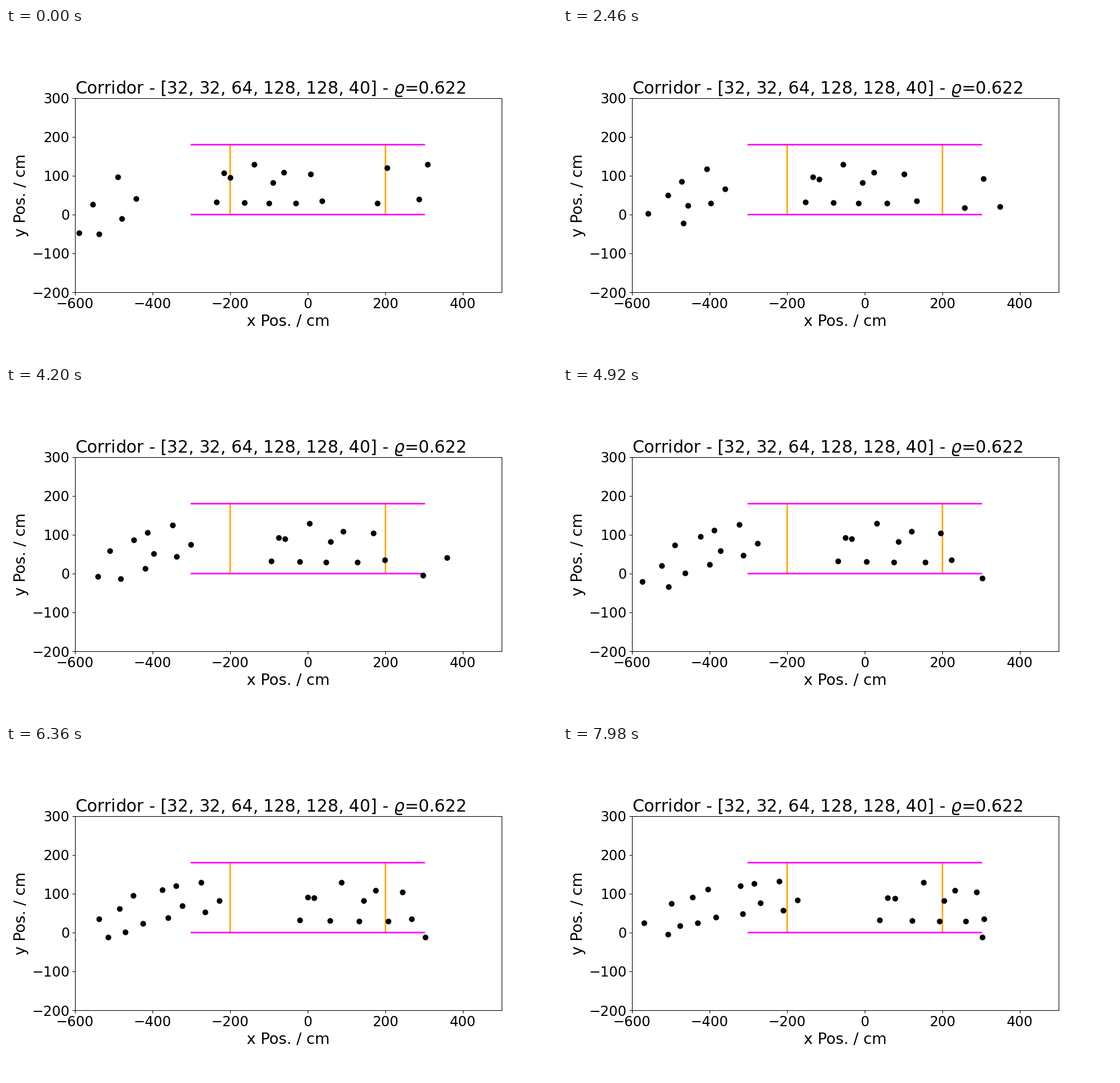
A matplotlib script that plays this animation: 966x580 px, repeating every 8000 ms.

```python
import numpy as np
import matplotlib.pyplot as plt
from matplotlib.animation import FuncAnimation

W, H, DPI = 966, 580, 100
K = 0.966                # scale of a 10 inch wide layout
times = np.arange(134) * 0.06

UPPER, MIDDLE, LOWER = 235, 267, 284   # heights the queue settles at
SETTLE = 3.2                           # seconds

# Where people start, in stage pixels; the third value is a later entry time
IN_CORRIDOR = [(369, 305), (418, 306), (435, 239), (461, 307), (468, 271),
               (487, 253), (508, 307), (534, 256), (554, 303)]
QUEUE = {
    UPPER: [(128, 359), (152, 309), (196, 261), (129, 360, 1.4),
            (145, 364, 3.3), (131, 358, 4.45)],
    MIDDLE: [(382, 254), (393, 262), (163, 361), (228, 299),
             (113, 345, 6.1), (167, 358, 6.8)],
    LOWER: [(203, 334), (195, 360, 1.62), (180, 360, 3.0),
            (176, 362, 4.4), (159, 360, 5.1)],
}
# Start, end, arrival time, time of leaving the scene
EXITS = [
    ((739, 239), (778, 257), 1.4, 1.4),
    ((724, 300), (771, 319), 3.0, 3.0),
    ((668, 245), (776, 307), 4.5, 4.5),
    ((651, 307), (735, 335), 4.6, 8.0),
]


def speed(x):
    """Pixels per second: faster inside the corridor, slower past its end."""
    rush = 4.5 * np.exp(-((x - 600) / 60) ** 2)
    jam = 9 / (1 + np.exp((712 - x) / 15))
    return 22.9 + rush - jam


# Travel time along the stage, shared by everyone
road = np.arange(100.0, 800.0)
clock = np.cumsum(1 / speed(road))


def walk(x, y, start=0, lane=None):
    """Follow the flow in x while the height settles into the lane."""
    t = times - start
    pace = 0.88 - 0.035 * start if start else 1
    phase = np.interp(x, road, clock) + pace * t
    px = np.interp(phase, clock, road)
    goal = y if lane is None else lane
    py = goal + (y - goal) * np.exp(-t / SETTLE)
    return np.where(t >= 0, [px, py], np.nan)


def leave(begin, end, arrive, gone):
    """Slow down in x while drifting downwards ever faster."""
    u = np.clip(times / arrive, 0, 1)
    px = begin[0] + (end[0] - begin[0]) * (1 - (1 - u) ** 1.3)
    py = begin[1] + (end[1] - begin[1]) * u ** 2
    return np.where(times < gone, [px, py], np.nan)


people = [walk(*p) for p in IN_CORRIDOR]
people += [walk(*p, lane=lane) for lane, group in QUEUE.items() for p in group]
people += [leave(*e) for e in EXITS]
px, py = np.array(people).transpose(1, 2, 0)
x_cm = (px - 120.75) / 0.6806 - 600
y_cm = (326.9 - py) / 0.6806

plt.rcParams["font.family"] = "DejaVu Sans"
fig, ax = plt.subplots(figsize=(W / DPI, H / DPI), dpi=DPI, facecolor="white")
fig.subplots_adjust(left=0.125, right=0.9, bottom=0.11, top=0.88)

ax.set_aspect("equal")
ax.set_xlim(-600, 500)
ax.set_ylim(-200, 300)
ax.set_xticks(range(-600, 500, 200))
ax.set_yticks(range(-200, 301, 100))
ax.tick_params(labelsize=18 * K, length=3.5 * K, width=0.8 * K, pad=3.5 * K)
for spine in ax.spines.values():
    spine.set_linewidth(0.8 * K)
ax.set_xlabel("x Pos. / cm", fontsize=20 * K, labelpad=4 * K)
ax.set_ylabel("y Pos. / cm", fontsize=20 * K, labelpad=4 * K)
ax.set_title(r"Corridor - [32, 32, 64, 128, 128, 40] - $\varrho$=0.622",
             loc="left", fontsize=22 * K, pad=6 * K)

for x in (-200, 200):
    ax.plot([x, x], [0, 180], color="orange", lw=2 * K, snap=False)
for y in (0, 180):
    ax.plot([-300, 300], [y, y], color="magenta", lw=2 * K, snap=False)
dots, = ax.plot([], [], "o", color="black", ms=6 * K, mew=1.5 * K, snap=False)


def update(i):
    step = (2 * i + 1) // 3   # 40 ms ticks, 60 ms steps
    dots.set_data(x_cm[step], y_cm[step])
    return dots,


anim = FuncAnimation(fig, update, frames=200, interval=40,
                     init_func=lambda: update(0), repeat=True, repeat_delay=0)
plt.show()
```
